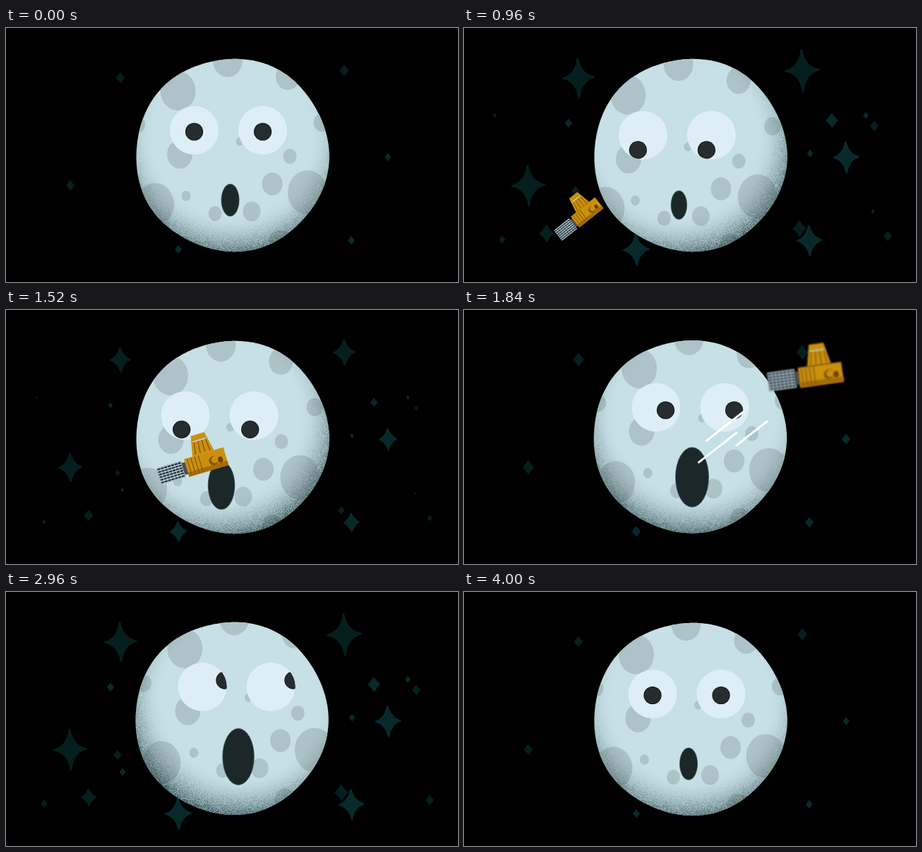
An HTML page with a canvas for the animation above (4.16 s loop, 640 by 360 pixels).

```html
<!DOCTYPE html>
<html lang="en">
<head>
<meta charset="utf-8">
<title>Surprised moon</title>
<style>
html, body { margin: 0; width: 640px; height: 360px; overflow: hidden; background: #000; }
canvas { display: block; }
</style>
</head>
<body>
<canvas id="stage" width="640" height="360"></canvas>
<script>
const LOOP = 4160, W = 640, H = 360, TAU = Math.PI * 2, DEG = TAU / 360;
const ctx = document.getElementById('stage').getContext('2d');

// Monotone curve through column c of rows [time, a, b, ...]
function at(rows, t, c = 1) {
  const n = rows.length - 1;
  if (t <= rows[0][0]) return rows[0][c];
  if (t >= rows[n][0]) return rows[n][c];
  const i = rows.findIndex(r => r[0] > t) - 1;
  const rate = k => k < 0 || k >= n ? 0 : (rows[k + 1][c] - rows[k][c]) / (rows[k + 1][0] - rows[k][0]);
  const slope = k => {
    const a = rate(k - 1), b = rate(k);
    return a * b > 0 ? 2 * a * b / (a + b) : 0;
  };
  const d = rows[i + 1][0] - rows[i][0], p = (t - rows[i][0]) / d;
  return rows[i][c] + rate(i) * d * p * p * (3 - 2 * p)
    + d * p * (1 - p) * ((1 - p) * slope(i) - p * slope(i + 1));
}
const pose = (rows, t) => rows[0].slice(1).map((_, i) => at(rows, t, i + 1));

// time, x, y
const face = [[0, 0, 0], [640, -3, 2], [1280, -22, 11], [1840, 5.5, -7],
  [2320, 12.5, -11], [2960, 11.5, -10.5], [LOOP, 0, 0]];
const gaze = [[720, 0, 2], [960, -7, 21], [1440, -7, 21], [1840, 13.5, 4],
  [2320, 28, -13.5], [3100, 32, -8], [3700, 0, 2]];
const gape = [[0, 13], [640, 10], [2320, 27.4], [4000, 13]];
// time, x, y, scale, degrees
const flight = [[460, 235, 195, .55, -56], [640, 201, 238, .63, -52], [1280, 135, 292, 1, -24],
  [1840, 474.5, 96, 1.17, -8], [2000, 496, 80, 1.05, -3], [2320, 469, 82, .8, 4], [2720, 380, 115, .6, 14]];

// Stars sharing a twinkle: x, y, size, lit
const twinkles = [
  { start: 0, peak: 640, stars: [[162, 70.5, 31], [479, 60, 33], [244, 314, 25, 1], [489, 301, 24, 1],
    [581, 139, 8], [475, 284, 13], [165, 255, 6, 1]] },
  { start: 250, peak: 960, stars: [[91, 223, 30], [541, 183, 23, 1], [521, 131, 10.5, 1], [117, 291, 13]] },
  { start: 640, peak: 1000, stars: [[148, 135, 6.5, 1], [158, 231, 7], [490, 178, 5.5, 1],
    [569, 124, 5, 1], [54, 300, 6], [600, 295, 7.5]] }
];

// x, y, radius
const craters = [
  [243.5, 89, 25], [314, 46, 21], [399, 69, 17], [447, 134, 11.5], [246, 179, 18], [331, 161, 5.5],
  [402, 182, 9.5], [377, 221, 14.5], [427, 233, 28], [348, 260, 12.5], [296, 263, 9.5], [255, 238, 6.5],
  [211, 250, 27], [259, 129, 6], [287, 147, 8], [186, 137, 11], [387, 303, 15]
];

// A slightly five-sided disc
const moon = new Path2D();
for (let a = 0; a < TAU; a += .02) {
  const r = 136.6 + Math.cos(5 * (a - 6 * DEG));
  moon.lineTo(320.3 + r * Math.cos(a), 180 + r * Math.sin(a));
}

function layer() {
  const c = document.createElement('canvas');
  c.width = W;
  c.height = H;
  return c.getContext('2d');
}
const grain = layer(), shade = layer();
const speckle = grain.createImageData(W, H);
for (let i = 3, seed = 7; i < speckle.data.length; i += 4) {
  seed = (seed * 1664525 + 1013904223) >>> 0;
  speckle.data[i] = 90 + 165 * (seed / 2 ** 32);
}
grain.putImageData(speckle, 0, 0);

function oval(x, y, rx, ry, fill) {
  ctx.beginPath();
  ctx.ellipse(x, y, rx, ry, 0, 0, TAU);
  ctx.fillStyle = fill;
  ctx.fill();
}

function line(x0, y0, x1, y1, colour, width) {
  ctx.beginPath();
  ctx.moveTo(x0, y0);
  ctx.lineTo(x1, y1);
  ctx.strokeStyle = colour;
  ctx.lineWidth = width;
  ctx.stroke();
}

// Upright trapezium centred on x
function block(x, top, bottom, topWidth, bottomWidth, fill) {
  ctx.beginPath();
  ctx.moveTo(x - topWidth / 2, top);
  ctx.lineTo(x + topWidth / 2, top);
  ctx.lineTo(x + bottomWidth / 2, bottom);
  ctx.lineTo(x - bottomWidth / 2, bottom);
  ctx.fillStyle = fill;
  ctx.fill();
}

// The waist stays put while the four tips grow
function star(x, y, size, lit) {
  if (size < .4) return;
  const edge = Math.min(2.4, size * .12), h = size - edge / 2, w = h * .8;
  const c = Math.min(4, h / 2), b = Math.min(3.6, w / 2);
  ctx.save();
  ctx.translate(x, y);
  ctx.rotate(-.04);
  ctx.beginPath();
  ctx.moveTo(0, -h);
  ctx.quadraticCurveTo(b, -c, w, 0);
  ctx.quadraticCurveTo(b, c, 0, h);
  ctx.quadraticCurveTo(-b, c, -w, 0);
  ctx.quadraticCurveTo(-b, -c, 0, -h);
  ctx.fillStyle = ctx.strokeStyle = lit ? '#082a2c' : '#041f1e';
  ctx.lineWidth = edge;
  ctx.lineJoin = 'round';
  ctx.fill();
  ctx.stroke();
  ctx.restore();
}

function drawStars(t) {
  const u = t % 2000;
  for (const { start, peak, stars } of twinkles) {
    const p = u < peak ? (u - start) / (peak - start) : (1900 - u) / (1900 - peak);
    const glow = Math.sin(Math.max(0, p) * TAU / 4);
    for (const [x, y, size, lit] of stars) {
      const least = size > 20 ? size / 4 : 0;
      star(x, y, least + (size - least) * glow, lit);
    }
  }
  // Two stars flash around 1200 and 2400 ms
  const away = Math.abs(Math.abs(t - 1800) - 600) / 400;
  const flash = 6.5 * Math.cos(Math.min(1, away) * TAU / 4);
  star(43.5, 124, flash);
  star(579, 260, flash * .85, 1);
}

function drawSatellite(t) {
  if (t < 460 || t > 2720) return;
  const [x, y, scale, turn] = pose(flight, t);
  const gold = '#cb900d', brown = '#8a5a08', pale = '#c3d6de';
  ctx.save();
  if (t > 1560 && t < 2000) ctx.filter = 'blur(0.8px)';
  ctx.translate(x, y);
  ctx.rotate(turn * DEG);
  ctx.scale(scale, scale);
  // Solar panel
  block(-21, -11, 11, 33, 33, '#27343c');
  for (let i = 0; i < 7; i++) line(-37.5, -10.5 + i * 3.5, -4.5, -10.5 + i * 3.5, pale, 1.3);
  for (let i = 0; i < 8; i++) line(-37 + i * 4.6, -11, -37 + i * 4.6, 11, pale, .7);
  block(-2, -8, 8, 5, 5, '#4a5054');
  // Head
  block(26, -38, -12, 18, 29, gold);
  for (let i = 0; i < 4; i++) line(19 + i * 5, -31, 16 + i * 6.5, -13, brown, 1.3);
  line(17, -30, 35, -30, pale, 1.5);
  // Body
  block(26.5, -12, 12, 53, 53, gold);
  block(26.5, 6, 12, 53, 53, '#a56d09');
  for (let i = 0; i < 4; i++) line(4 + i * 5, -11, 4 + i * 5, 11, brown, 1.2);
  oval(36, 1, 6, 6, brown);
  oval(38, 0, 4.5, 4.5, gold);
  oval(45, 2, 3.2, 4, '#6d4306');
  ctx.restore();
}

function drawShade(dx, dy) {
  const x = 320 + dx * 1.25, y = 153 + dy * .3;
  const glow = shade.createRadialGradient(x, y, 112, x, y, 170);
  for (let p = 0; p <= 1; p += .125) glow.addColorStop(p, `rgba(28,56,60,${p ** 2})`);
  shade.globalCompositeOperation = 'copy';
  shade.fillStyle = glow;
  shade.fillRect(0, 0, W, H);
  shade.globalCompositeOperation = 'destination-in';
  shade.drawImage(grain.canvas, 0, 0);
  ctx.drawImage(shade.canvas, 0, 0);
}

function drawEye(x, y, side, t) {
  ctx.save();
  ctx.translate(x, y);
  if (t >= 560 && t < 760) {
    ctx.scale(side, 1);
    ctx.beginPath();
    ctx.moveTo(-34, 21);
    ctx.quadraticCurveTo(-2, 57, 30, 23);
    ctx.quadraticCurveTo(-2, 39, -34, 21);
    ctx.fillStyle = '#24242f';
    ctx.fill();
  } else {
    const [px, py] = pose(gaze, t);
    oval(0, 0, 34.5, 34.5, '#deeef7');
    ctx.clip();
    oval(px, py, 12.6, 12.6, '#111719');
    oval(px, py, 11.6, 11.6, '#272c2e');
  }
  ctx.restore();
}

function drawMoon(t) {
  const [dx, dy] = pose(face, t);
  const lift = Math.min(dy, 0) * .1;
  ctx.save();
  ctx.translate(lift, lift);
  ctx.clip(moon);
  ctx.fillStyle = '#c6e0e5';
  ctx.fillRect(0, 0, W, H);
  // Craters near the rim slide less than those in the middle
  for (const [x, y, r] of craters) {
    const k = 1.08 - .3 * (Math.hypot(x - 321, y - 180) / 136) ** 2;
    oval(x + dx * k - lift, y + dy * k - lift, r, r * 1.12, '#adc3c7');
  }
  drawShade(dx, dy);
  ctx.restore();

  drawEye(266.5 + dx, 145 + dy, 1, t);
  drawEye(363.5 + dx, 145 + dy, -1, t);
  const m = at(gape, t);
  oval(317.5 + dx, 244 + dy, m, m * 1.78, '#455d60');
  oval(317.5 + dx, 244 + dy, m - .9, m * 1.78 - .9, '#1c272a');
}

function drawSpeedLines(t) {
  const p = (t - 1840) / 160;
  if (Math.abs(p) > 1) return;
  const keep = 1 - .6 * Math.abs(p), run = Math.cos(38 * DEG), rise = Math.sin(38 * DEG);
  ctx.lineCap = 'round';
  for (const [x, y, length] of [[396, 144, 67], [386, 174, 68], [429, 158, 55]]) {
    const head = p * 50, tail = head - length * keep;
    line(x + head * run, y - head * rise, x + tail * run, y - tail * rise, '#fff', 3);
  }
  ctx.lineCap = 'butt';
}

// Steps of 80 ms, slowing to 160 ms around each rest
function step(t) {
  const u = t % 2000, slow = u < 160 || u >= 1680, size = slow ? 160 : 80;
  const from = u >= 1680 ? 1680 : 0;
  return t - u + from + Math.floor((u - from) / size) * size;
}

function frame() {
  const t = step(performance.now() % LOOP);
  const front = t >= 880 && t < 2160;
  ctx.fillStyle = '#000';
  ctx.fillRect(0, 0, W, H);
  drawStars(t);
  if (!front) drawSatellite(t);
  drawMoon(t);
  drawSpeedLines(t);
  if (front) drawSatellite(t);
  requestAnimationFrame(frame);
}
frame();
</script>
</body>
</html>
```
